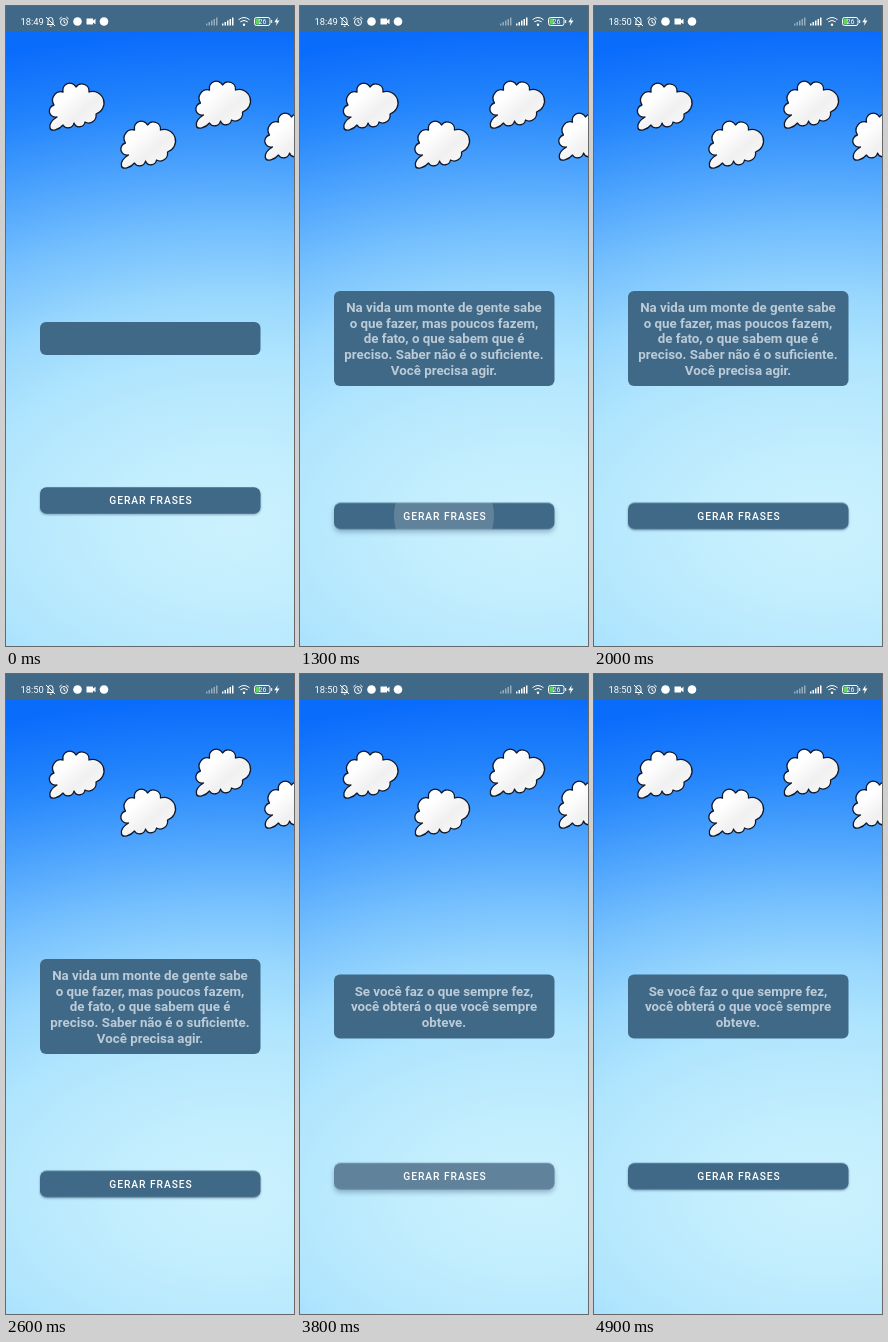
Animation, 288 px wide and 640 px high, one loop 5000 ms. Source, as an HTML page:

```html
<!DOCTYPE html>
<html lang="pt">
<head>
<meta charset="utf-8">
<title>Gerar frases</title>
<style>
  html, body { margin: 0; width: 100%; height: 100%; overflow: hidden; }
  svg { display: block; width: 288px; height: 640px; font-family: Roboto, sans-serif; }
  .bar { fill: #3f6986; }
  .phrase { font-weight: 700; font-size: 13.3px; fill: #bccbd7; text-anchor: middle; }
  .label { font-weight: 500; font-size: 10.27px; letter-spacing: .092em; fill: #fff; text-anchor: middle; }
  .clock { font-size: 9.4px; fill: #fff; }
  .line { fill: none; stroke: #fff; stroke-width: 1; }
  .anim { animation: 5s step-end infinite; }
  #empty { animation-name: empty; }
  #long { animation-name: long; }
  #short { animation-name: short; }
  #before { animation-name: before; }
  #after { animation-name: after; }
  #button { animation-name: place; }
  #face { animation-name: lift; }
  #ripple { animation-name: ripple; transform-origin: 144px 494px; }

  @keyframes empty { 0% { visibility: visible } 26%, 100% { visibility: hidden } }
  @keyframes long { 0% { visibility: hidden } 26% { visibility: visible } 76%, 100% { visibility: hidden } }
  @keyframes short { 0% { visibility: hidden } 76%, 100% { visibility: visible } }
  @keyframes before { 0% { visibility: visible } 40%, 100% { visibility: hidden } }
  @keyframes after { 0% { visibility: hidden } 40%, 100% { visibility: visible } }
  @keyframes place {
    0% { transform: none }
    26% { transform: translateY(15.5px) }
    76%, 100% { transform: translateY(7.75px) }
  }
  @keyframes lift {
    0%, 28%, 78%, 100% { filter: drop-shadow(0 1.4px 1px rgba(20, 40, 80, .4)) }
    26%, 74%, 76% { filter: drop-shadow(0 3.5px 2.5px rgba(20, 40, 80, .3)) }
  }
  @keyframes ripple {
    0%, 34%, 80%, 100% { opacity: 0; transform: scale(0) }
    26% { opacity: .18; transform: scale(.4) }
    28%, 74% { opacity: .18; transform: scale(.68) }
    30%, 76% { opacity: .18; transform: scale(1) }
    32%, 78% { opacity: .08; transform: scale(1) }
  }
</style>
</head>
<body>
<svg viewBox="0 0 288 640">
  <defs>
    <radialGradient id="sky" gradientUnits="userSpaceOnUse" cx="0" cy="0" r="500"
      gradientTransform="translate(230 520) scale(1.6 1)">
      <stop offset="0" stop-color="#cbf1fd"/>
      <stop offset=".144" stop-color="#c3eefd"/>
      <stop offset=".336" stop-color="#b0e5fe"/>
      <stop offset=".464" stop-color="#98d7fd"/>
      <stop offset=".592" stop-color="#74bffd"/>
      <stop offset=".72" stop-color="#4ca3fd"/>
      <stop offset=".848" stop-color="#2485fc"/>
      <stop offset=".988" stop-color="#0a6cfb"/>
    </radialGradient>
    <linearGradient id="puff" x1="0" y1="0" x2="1" y2="1">
      <stop offset=".3" stop-color="#fff"/>
      <stop offset=".6" stop-color="#f0f0f0"/>
      <stop offset="1" stop-color="#fdfdfd"/>
    </linearGradient>
    <path id="cloud" fill="url(#puff)" stroke="#10182a" stroke-width="1.3" stroke-linejoin="round"
      d="M57 86A7 7 0 0 1 70 81A7.2 7.2 0 0 1 83 86A11.2 11.2 0 0 1 90 108A7.5 7.5 0 0 1 79 116A5.7 5.7 0 0 1 68 117A6 6 0 0 1 57 119C53 124 45 126 44 122C43 118 46 114 51 111A6 6 0 0 1 48 99A8.5 8.5 0 0 1 57 86Z"/>
    <clipPath id="edge"><rect x="34" y="481.3" width="220.5" height="26.4" rx="6.5"/></clipPath>
  </defs>

  <rect width="288" height="640" fill="url(#sky)"/>
  <use href="#cloud"/>
  <use href="#cloud" x="71.5" y="38"/>
  <use href="#cloud" x="146.5" y="-2"/>
  <use href="#cloud" x="215.5" y="30"/>

  <rect class="bar" width="288" height="25.7"/>
  <text id="before" class="clock anim" x="14.5" y="19">18:49</text>
  <text id="after" class="clock anim" x="14.5" y="19">18:50</text>
  <path class="line" d="M41 18.5H48M42 18V14.5A2.5 3 0 0 1 47 14.5V18M43.8 20.2H45.6M40 11L49 20"/>
  <g class="line">
    <circle cx="58" cy="16" r="3.5"/>
    <path d="M58 14V16.3L59.7 17.2M53.3 13L55.7 11M62.7 13L60.3 11"/>
  </g>
  <g fill="#fff">
    <circle cx="71.5" cy="15.5" r="4.3"/>
    <circle cx="98" cy="15.5" r="4.3"/>
    <path d="M80.5 12.5H87V14.5L89.5 12.8V18.2L87 16.5V18.5H80.5Z"/>
    <path d="M216 17.5h1.5v2H216zM218.5 16h1.5v3.5h-1.5zM221 14.5h1.5v5H221zM223.5 13h1.5v6.5h-1.5zM226 11.5h1.5v8H226z"/>
    <path opacity=".45" d="M200 17.5h1.5v2H200zM202.5 16h1.5v3.5h-1.5zM205 14.5h1.5v5H205zM207.5 13h1.5v6.5h-1.5zM210 11.5h1.5v8H210z"/>
    <path d="M271.8 11L268.3 16.2H270.7L269.8 20L273.5 14.6H271Z"/>
    <circle cx="238" cy="18.8" r="1.2"/>
  </g>
  <path class="line" d="M232.5 13.7Q238 9.3 243.5 13.7M234.3 15.8Q238 13 241.7 15.8"/>
  <rect class="line" x="248.5" y="11.5" width="15.5" height="8" rx="2"/>
  <rect x="249.5" y="12.5" width="4.5" height="6" rx="1" fill="#62d65b"/>
  <path class="line" d="M265.7 14V17"/>
  <text x="256.4" y="18.1" font-size="7" fill="#fff" text-anchor="middle">26</text>

  <rect id="empty" class="bar anim" x="34" y="316" width="220.5" height="33" rx="6"/>
  <g id="long" class="anim">
    <rect class="bar" x="34" y="285" width="220.5" height="95" rx="6"/>
    <g class="phrase">
      <text x="144" y="306.2">Na vida um monte de gente sabe</text>
      <text x="144" y="321.8">o que fazer, mas poucos fazem,</text>
      <text x="144" y="337.4">de fato, o que sabem que é</text>
      <text x="144" y="353">preciso. Saber não é o suficiente.</text>
      <text x="144" y="368.6">Você precisa agir.</text>
    </g>
  </g>
  <g id="short" class="anim">
    <rect class="bar" x="34" y="300.5" width="220.5" height="64" rx="6"/>
    <g class="phrase">
      <text x="144" y="321.8">Se você faz o que sempre fez,</text>
      <text x="144" y="337.4">você obterá o que você sempre</text>
      <text x="144" y="353">obteve.</text>
    </g>
  </g>

  <g id="button" class="anim">
    <rect id="face" class="bar anim" x="34" y="481.3" width="220.5" height="26.4" rx="6.5"/>
    <g clip-path="url(#edge)">
      <circle id="ripple" class="anim" cx="144" cy="494" r="125" fill="#fff"/>
    </g>
    <text class="label" x="145" y="498.3">GERAR FRASES</text>
  </g>
</svg>
</body>
</html>
```
